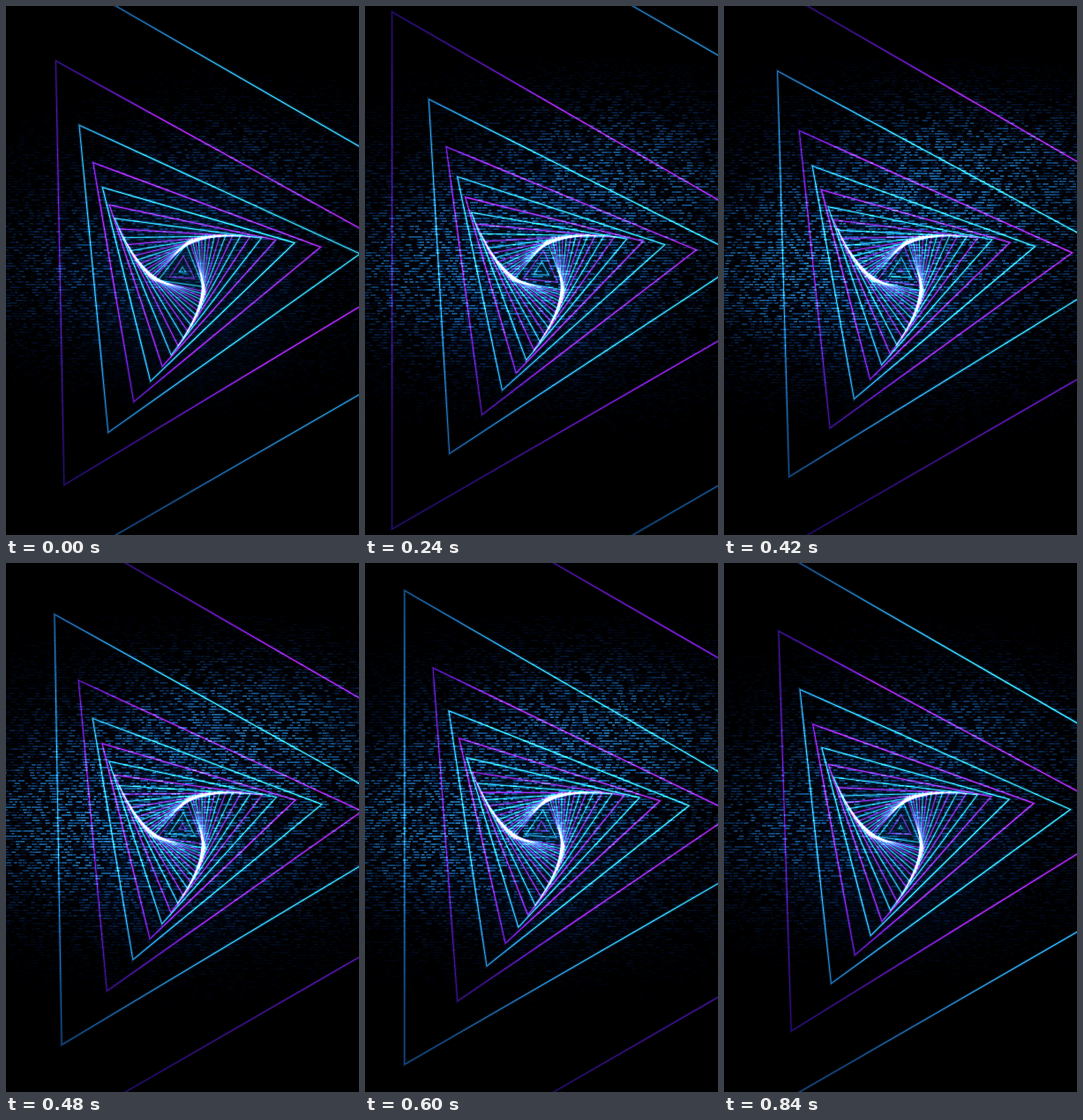
An HTML page with a canvas that plays this animation: 400x600 px, repeating every 900 ms.

```html
<!DOCTYPE html>
<html lang="en">
<head>
<meta charset="utf-8">
<title>Triangle tunnel</title>
<style>
html, body { margin: 0; width: 100%; height: 100%; overflow: hidden; background: #000; }
canvas { display: block; }
</style>
</head>
<body>
<canvas id="stage" width="400" height="600"></canvas>
<script>
const ctx = document.getElementById('stage').getContext('2d');
const W = 400, H = 600, CX = 200, CY = 300, TAU = Math.PI * 2;
const LOOP = 900, HOLD = 60, POSES = 25;
const FOCAL = 742, NEAR = 1.671, FAR = 24.02, GROW = 2.7;
const TWIST = 4.25 * Math.PI / 180, TWIST_START = 2.405;

function radial(x, y, radius, stops) {
  const g = ctx.createRadialGradient(x, y, 0, x, y, radius);
  stops.forEach(([at, color]) => g.addColorStop(at, color));
  return g;
}

const CYAN = radial(270, 255, 340, [
  [0, 'rgb(50,215,235)'], [0.4, 'rgb(54,215,255)'], [0.55, 'rgb(48,180,240)'],
  [0.75, 'rgb(32,118,188)'], [1, 'rgb(20,75,135)']
]);
const PURPLE = radial(270, 255, 340, [
  [0, 'rgb(165,45,235)'], [0.45, 'rgb(180,38,255)'], [0.58, 'rgb(118,26,212)'],
  [0.76, 'rgb(62,18,145)'], [1, 'rgb(38,12,110)']
]);
const HAZE = radial(CX, CY, 170, [
  [0, 'rgba(0,65,110,0.35)'], [0.5, 'rgba(0,35,85,0.2)'], [1, 'rgba(0,10,40,0)']
]);

function hash(a, b, c) {
  let n = Math.imul(a + 11, 374761393) ^ Math.imul(b + 37, 668265263) ^ Math.imul(c + 5, 1274126177);
  n = Math.imul(n ^ (n >>> 13), 1103515245);
  n = Math.imul(n ^ (n >>> 15), 2246822519);
  return ((n ^ (n >>> 16)) >>> 0) / 4294967296;
}

const blob = (x, y, cx, cy, sx, sy) => Math.exp(-(((x - cx) / sx) ** 2) - ((y - cy) / sy) ** 2);

function drawStatic(phase, pose) {
  const level = 0.5 + 0.5 * Math.sin(Math.PI * phase) ** 0.8;
  const sway = 20 * Math.sin(TAU * phase);
  for (let row = 0; row < 160; row++) {
    const y = 60 + row * 3;
    for (let col = 0; col < 82; col++) {
      const x = col * 5 - 5 + hash(row, col, 3) * 5;
      const cloud = 0.6 * blob(x, y, 205, 275, 260, 145)
        + 0.45 * blob(x, y, 280 + sway, 185, 140, 75)
        + 0.45 * blob(x, y, 80 + sway, 300, 120, 75);
      const v = level * cloud * (1.25 * hash(col, row, pose) - 0.12);
      if (v < 0.05) continue;
      ctx.fillStyle = `rgb(${8 + 28 * v * v},${12 + 100 * v},${55 + 110 * v})`;
      ctx.globalAlpha = Math.min(1, v * 1.8);
      ctx.fillRect(x, y, 3 + 4 * hash(col, row, pose + 50), 2);
    }
  }
  ctx.globalAlpha = 1;
}

function drawTriangle(z, color) {
  const radius = FOCAL / z * Math.min(1, (FAR - z) / GROW);
  const turn = -Math.min(Math.PI / 2, TWIST * Math.max(0, z - TWIST_START));
  const openness = Math.min(1, radius / 130);
  ctx.beginPath();
  for (let i = 0; i < 3; i++) {
    const a = turn + i * TAU / 3;
    ctx.lineTo(CX + radius * Math.cos(a), CY + radius * Math.sin(a));
  }
  ctx.closePath();
  ctx.strokeStyle = color;
  ctx.globalAlpha = 0.08 + 0.14 * openness;
  ctx.lineWidth = 3.5;
  ctx.stroke();
  ctx.globalAlpha = 0.5 + 0.4 * openness;
  ctx.lineWidth = 1.1;
  ctx.stroke();
  ctx.globalAlpha = 1;
}

function draw(pose) {
  const phase = pose / POSES;
  ctx.globalCompositeOperation = 'source-over';
  ctx.fillStyle = '#000';
  ctx.fillRect(0, 0, W, H);
  drawStatic(phase, pose);
  ctx.globalCompositeOperation = 'lighter';
  ctx.fillStyle = HAZE;
  ctx.fillRect(0, 0, W, H);
  for (let i = 24; i >= 0; i--) {
    const z = NEAR + i - 2 * phase;
    if (z > 0.9 && z < FAR) drawTriangle(z, i % 2 ? PURPLE : CYAN);
  }
}

let shown = -1;
function tick() {
  const slot = Math.floor(performance.now() % LOOP / HOLD);
  const pose = Math.floor(slot * POSES * HOLD / LOOP);
  if (pose !== shown) draw(shown = pose);
  requestAnimationFrame(tick);
}
tick();
</script>
</body>
</html>
```
